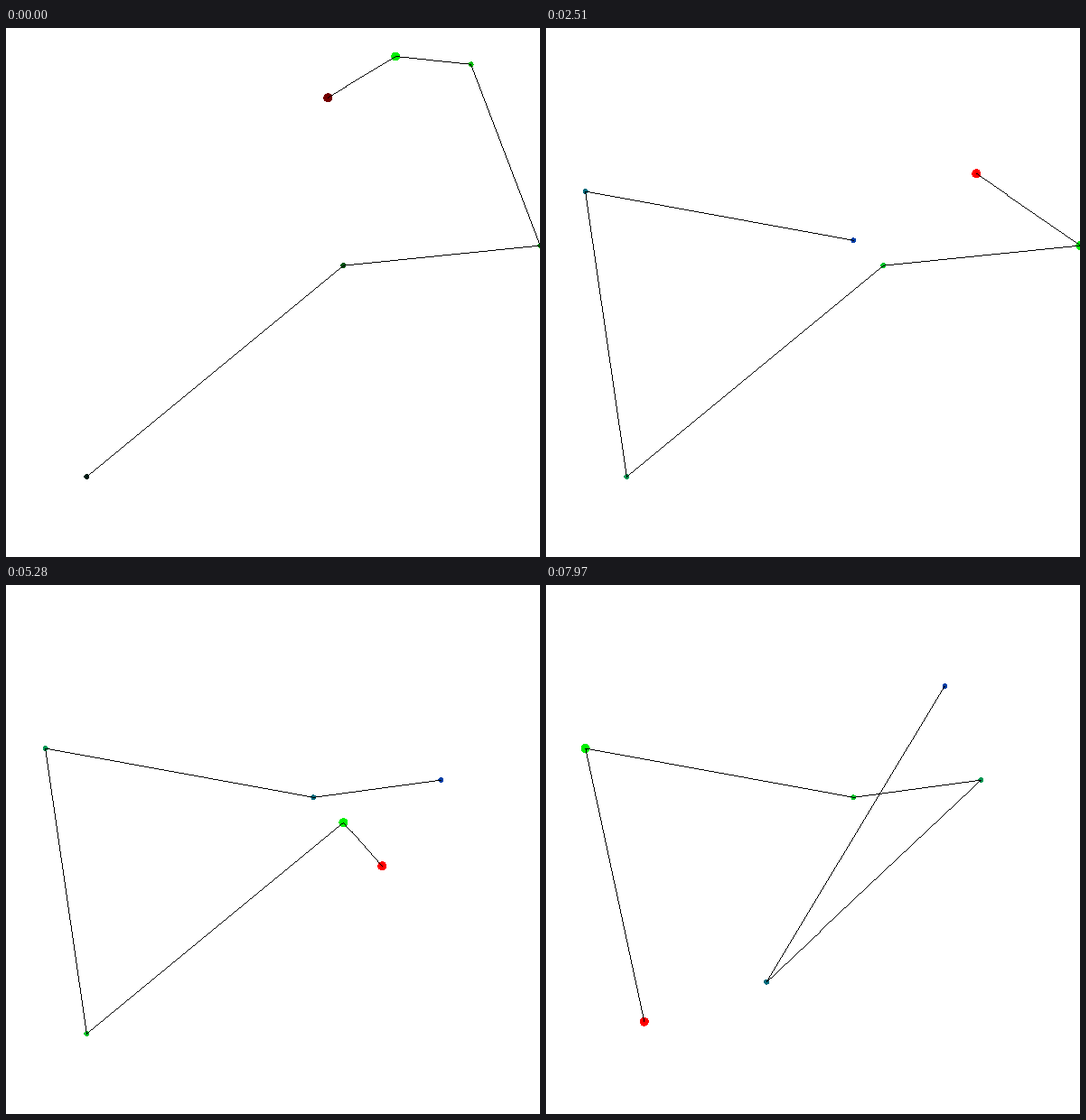
Animation of 591x586 px, one loop 8000 ms. Source, as an HTML page with a canvas:

```html
<!DOCTYPE html>
<html>
<head>
<meta charset="utf-8">
<style>
html, body { margin: 0; width: 100%; height: 100%; overflow: hidden; background: #fff; }
canvas { display: block; width: 100vw; height: 100vh; image-rendering: pixelated; }
</style>
</head>
<body>
<canvas width="591" height="586"></canvas>
<script>
const LOOP = 8000;
const UNIT = 7.5;       // pixels per step at velocity 1
const REACH = 29;       // a waypoint this close counts as reached
const VISIBLE = 5;
const START = { x: 356.25, y: 77.2, vx: 2, vy: -2, reached: 0 };

const waypoints = [
  [431.3, 31.5], [514.6, 40.3], [591.4, 241], [373.4, 263.2], [89.4, 497],
  [43.6, 181], [340.4, 235.3], [481.4, 216.1], [244.2, 439.7], [441.5, 112]
];

// From the given step on, the chaser steers for this velocity.
const turns = [
  [0, 2, -2], [10, -2, 2], [16, 2, 2], [28, -2, 2], [33, -2, 1],
  [38, -2, -2], [40, -1, -2], [45, -2, -2], [46, -2, 2], [60, -2, 1]
];

const ctx = document.querySelector('canvas').getContext('2d');

// Velocity changes by at most one unit per step; the top edge stops it.
function advance(s, step) {
  const [, wantX, wantY] = turns.findLast(([from]) => from <= step);
  const vx = s.vx + Math.sign(wantX - s.vx);
  let vy = s.vy + Math.sign(wantY - s.vy);
  const x = s.x + vx * UNIT;
  let y = s.y + vy * UNIT;
  if (y < UNIT / 2) {
    y = UNIT / 2;
    vy = 0;
  }
  const [tx, ty] = waypoints[s.reached];
  const reached = s.reached + (Math.hypot(tx - x, ty - y) < REACH ? 1 : 0);
  return { x, y, vx, vy, reached };
}

// Steps become visible on a coarser clock, so they hold for one or two ticks.
function stepAt(ms) {
  const tick = Math.floor(ms / 78.1 + 0.4);
  return Math.floor(tick * 0.628 + 0.296);
}

function disc(cx, cy, r, color) {
  ctx.fillStyle = color;
  for (let y = Math.floor(cy - r); y <= cy + r; y++)
    for (let x = Math.floor(cx - r); x <= cx + r; x++)
      if (Math.hypot(x + 0.5 - cx, y + 0.5 - cy) <= r) ctx.fillRect(x, y, 1, 1);
}

// One hard pixel per step along the longer axis
function line([x0, y0], [x1, y1]) {
  const n = Math.ceil(Math.max(Math.abs(x1 - x0), Math.abs(y1 - y0)));
  ctx.fillStyle = '#000';
  for (let i = 0; i <= n; i++)
    ctx.fillRect(Math.floor(x0 + (x1 - x0) * i / n), Math.floor(y0 + (y1 - y0) * i / n), 1, 1);
}

function draw(step) {
  let chaser = START;
  for (let i = 1; i <= step; i++) chaser = advance(chaser, i);
  const { x, y, reached } = chaser;
  const ahead = waypoints.slice(reached, reached + VISIBLE);
  const dim = step === 0;

  ctx.clearRect(0, 0, 591, 586);
  ahead.forEach(([cx, cy], i) => {
    const green = 240 - (dim ? 52 : 44) * i;
    const blue = (dim ? 6 : 42) * i;
    disc(cx, cy, i ? 3 : 5, `rgb(0, ${green}, ${blue})`);
  });
  disc(x, y, 5, dim ? '#730000' : '#f00');
  ahead.forEach((point, i) => line(i ? ahead[i - 1] : [x, y], point));
}

function frame() {
  draw(stepAt(performance.now() % LOOP));
  requestAnimationFrame(frame);
}
frame();
</script>
</body>
</html>
```
